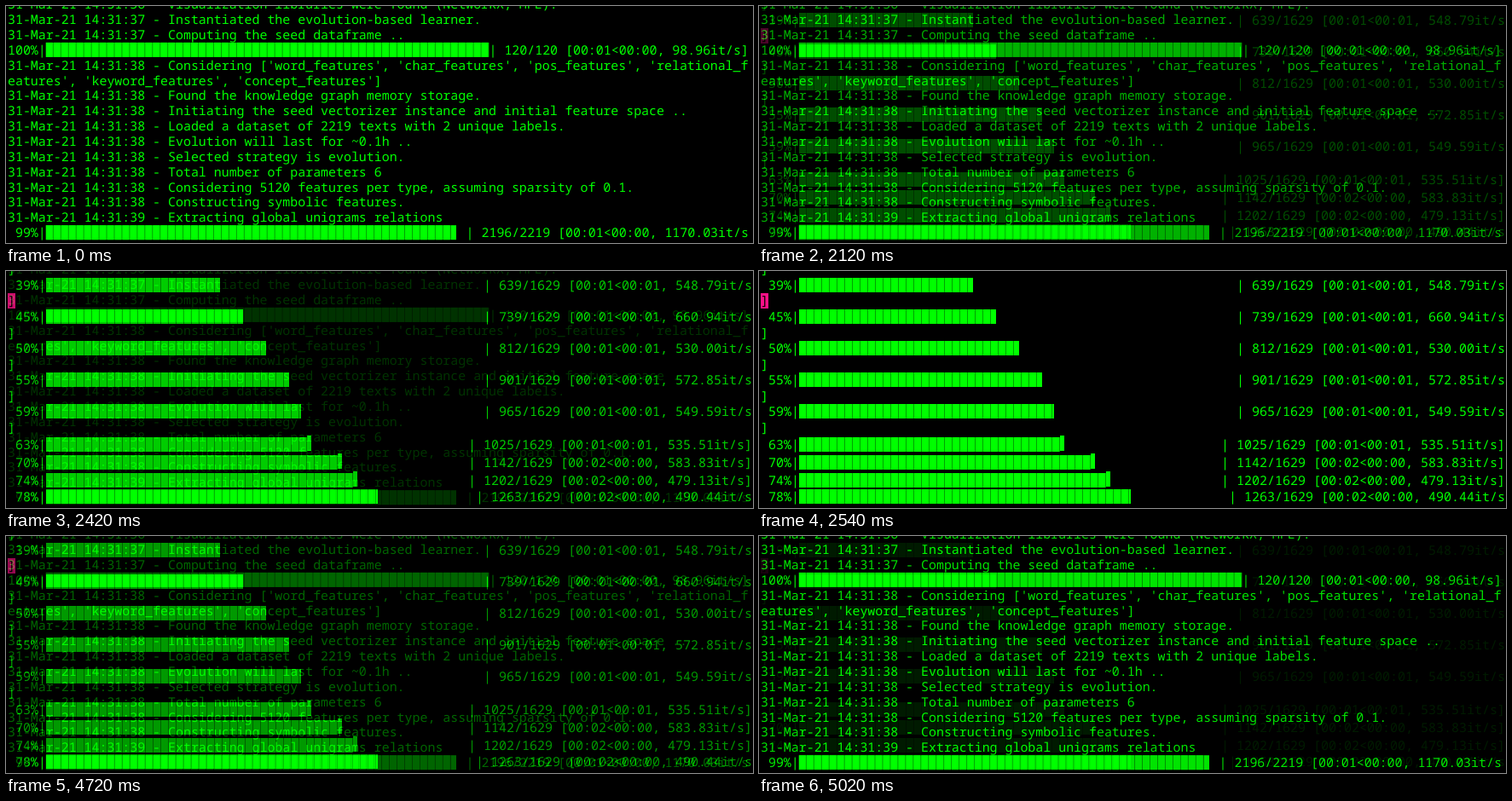
An HTML page that plays this animation: 876 px wide and 278 px high, repeating every 5080 ms.

```html
<!DOCTYPE html>
<html lang="en">
<head>
<meta charset="utf-8">
<title>Terminal crossfade</title>
<style>
  html, body { margin: 0; width: 100%; height: 100%; overflow: hidden; background: #000; }
  svg { display: block; }
  text {
    font-family: "Noto Sans Mono", "DejaVu Sans Mono", monospace;
    fill: #0f0; white-space: pre; text-rendering: geometricPrecision;
  }
</style>
</head>
<body>
<svg width="876" height="278" viewBox="0 0 876 278">
  <g id="log"></g>
  <g id="bars" opacity="0"><rect width="876" height="278"/></g>
</svg>
<script>
const LEFT = 2, BAR_COL = 5, BAR_H = 17;

function add(parent, tag, attrs, content) {
  const el = document.createElementNS('http://www.w3.org/2000/svg', tag);
  for (const key in attrs) el.setAttribute(key, attrs[key]);
  if (content) el.textContent = content;
  parent.append(el);
  return el;
}

// A terminal screen: text and blocks sit on columns of equal width.
function screen(id, cell) {
  const group = document.getElementById(id);
  group.setAttribute('font-size', cell / 0.6);
  const colX = col => LEFT + col * cell;
  const rect = (x, y, width, height, fill = '#0f0') =>
    add(group, 'rect', { x, y, width, height, fill });
  const print = (str, y, col = 0) => add(group, 'text', { x: colX(col), y }, str);

  // Progress line: percentage, full cells, a partial cell, right-aligned counter.
  function progress(percent, cells, part, lift, counter, baseline, top) {
    const x = colX(BAR_COL);
    print(percent.padStart(4) + '|', baseline);
    rect(x, top, cells * cell, BAR_H, '#009800');
    for (let i = 0; i < cells; i++) rect(x + i * cell, top, cell - 0.9, BAR_H);
    if (part) rect(x + cells * cell, top - lift, part, BAR_H + (lift ? 1 : 0));
    print('| ' + counter, baseline, 97 - counter.length - 2);
  }
  return { rect, print, progress };
}

function drawLog() {
  const { print, progress } = screen('log', 8.96);
  const rowY = row => 3.2 + row * 17.86;
  const stamp = (sec, message, row) => print(`31-Mar-21 14:31:${sec} - ${message}`, rowY(row));
  const bar = (percent, cells, part, counter, row) =>
    progress(percent, cells, part, 0, counter, rowY(row), rowY(row) - 13.9);

  stamp(36, 'Visualization libraries were found (NetworkX, MFE).', 0);
  stamp(37, 'Instantiated the evolution-based learner.', 1);
  stamp(37, 'Computing the seed dataframe ..', 2);
  bar('100%', 58, 0, '120/120 [00:01<00:00, 98.96it/s]', 3);
  stamp(38, "Considering ['word_features', 'char_features', 'pos_features', 'relational_f", 4);
  print("eatures', 'keyword_features', 'concept_features']", rowY(5));
  [
    'Found the knowledge graph memory storage.',
    'Initiating the seed vectorizer instance and initial feature space ..',
    'Loaded a dataset of 2219 texts with 2 unique labels.',
    'Evolution will last for ~0.1h ..',
    'Selected strategy is evolution.',
    'Total number of parameters 6',
    'Considering 5120 features per type, assuming sparsity of 0.1.',
    'Constructing symbolic features.'
  ].forEach((message, i) => stamp(38, message, 6 + i));
  stamp(39, 'Extracting global unigrams relations', 14);
  bar('99%', 53, 6.3, '2196/2219 [00:01<00:00, 1170.03it/s', 15);
}

function drawBars() {
  const { rect, print, progress } = screen('bars', 9);
  const bar = (top, percent, cells, part, counter, lift = 0) =>
    progress(percent + '%', cells, part, lift, counter, top + 14, top);

  rect(2, 26, 9, 18, '#ff1088');
  [3, 40, 78, 115, 152, 189].forEach((y, i) => {
    const bracket = print(']', y);
    if (i === 1) bracket.style.fill = '#000';
  });
  bar(8, 39, 22, 6, '639/1629 [00:01<00:01, 548.79it/s');
  bar(45, 45, 25, 6, '739/1629 [00:01<00:01, 660.94it/s');
  bar(82, 50, 28, 6, '812/1629 [00:01<00:01, 530.00it/s');
  bar(119, 55, 31, 6, '901/1629 [00:01<00:01, 572.85it/s');
  bar(156, 59, 33, 2, '965/1629 [00:01<00:01, 549.59it/s');
  bar(195, 63, 34, 5, '1025/1629 [00:01<00:01, 535.51it/s]', 2);
  bar(216, 70, 38, 5, '1142/1629 [00:02<00:00, 583.83it/s]', 2);
  bar(237, 74, 40, 5, '1202/1629 [00:02<00:00, 479.13it/s]', 2);
  bar(256, 78, 43, 2, '1263/1629 [00:02<00:00, 490.44it/s');
}

drawLog();
drawBars();

// Hold 2 s, then fade in nine 60 ms steps; the second half runs it back.
const HOLD = 2000, STEP = 60, HALF = HOLD + 9 * STEP;
const bars = document.getElementById('bars');

function frame() {
  const t = performance.now() % (2 * HALF);
  const local = t % HALF;
  const mix = local < HOLD ? 0 : (Math.floor((local - HOLD) / STEP) + 1) / 10;
  bars.setAttribute('opacity', t < HALF ? mix : 1 - mix);
  requestAnimationFrame(frame);
}
frame();
</script>
</body>
</html>
```
